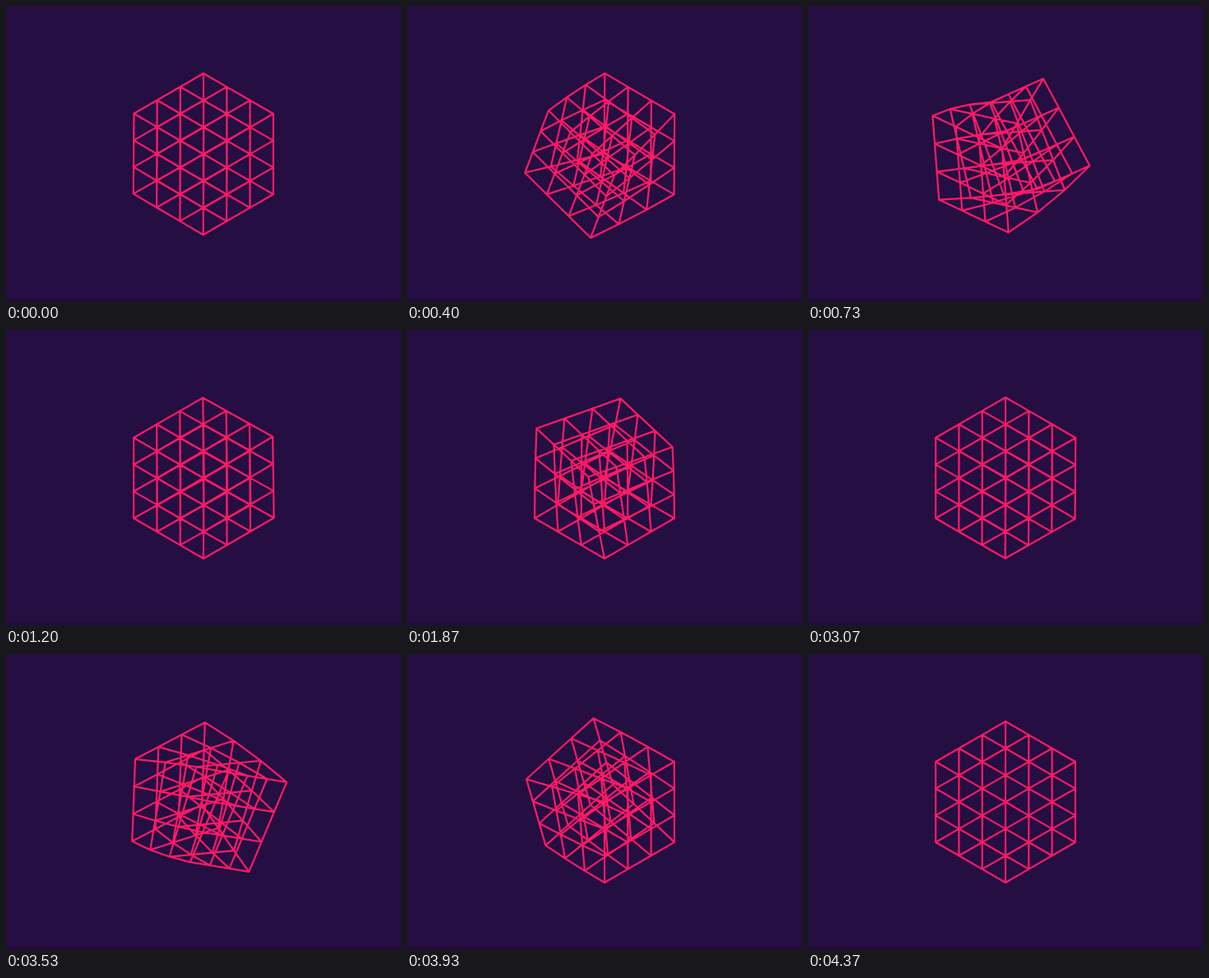
These frames come from a looping animation (480x360 px, 4610 ms). An HTML page:

```html
<!DOCTYPE html>
<html lang="en">
<head>
<meta charset="utf-8">
<title>Twisting cube</title>
<style>
  html, body { margin: 0; width: 100%; height: 100%; overflow: hidden; background: #240e42; }
  svg { display: block; width: 100%; height: 100%; }
</style>
</head>
<body>
<svg viewBox="0 0 480 360">
  <rect width="480" height="360" fill="#240e42"/>
  <rect y="356" width="480" height="4" fill="#200d38"/>
  <path id="grid" fill="none" stroke="#ff1a66" stroke-width="2.2" stroke-linecap="round" stroke-linejoin="round"/>
</svg>
<script>
const LOOP = 4610, STEP = 100 / 3, TURN = 46, MIRROR = 37;
const SIZE = 120, CELLS = 3;
const AXES = [2, 1, 0];

// Angle of the trailing face: [step, degrees]
const KEYS = [[10, 0], [13, 0.9], [15, 5.2], [16, 8.7], [19, 27], [22, 48.4],
  [24, 65.2], [26, 74], [29, 80.8], [32, 85.4], [35, 88.5], [39, 90]];

const slopes = KEYS.slice(1).map((p, i) => (p[1] - KEYS[i][1]) / (p[0] - KEYS[i][0]));
const tangents = KEYS.map((p, i) => {
  if (i === 0 || i === KEYS.length - 1) return 0;
  const a = slopes[i - 1], b = slopes[i];
  return 2 * a * b / (a + b);
});

function trailing(k) {
  if (k <= KEYS[0][0]) return 0;
  if (k >= KEYS[KEYS.length - 1][0]) return 90;
  const i = KEYS.findIndex(p => p[0] > k) - 1;
  const [x0, y0] = KEYS[i], [x1, y1] = KEYS[i + 1];
  const w = x1 - x0, s = (k - x0) / w, r = 1 - s;
  return y0 * (1 + 2 * s) * r * r + y1 * s * s * (3 - 2 * s)
    + w * s * r * (tangents[i] * r - tangents[i + 1] * s);
}

// The leading face makes the same move in reverse time
const leading = k => 90 - trailing(MIRROR - k);

// Every unit edge of the lattice, inside as well as on the faces
const edges = [];
for (let x = 0; x <= CELLS; x++)
  for (let y = 0; y <= CELLS; y++)
    for (let z = 0; z <= CELLS; z++)
      for (let d = 0; d < 3; d++) {
        const p = [x, y, z], q = [x, y, z];
        if (++q[d] <= CELLS) edges.push([p, q]);
      }

function place(cell, axis, lead, trail) {
  const p = cell.map(n => (n / CELLS - 0.5) * SIZE);
  const angle = (trail + (lead - trail) * cell[axis] / CELLS) * Math.PI / 180;
  const c = Math.cos(angle), s = Math.sin(angle);
  const u = (axis + 2) % 3, v = (axis + 1) % 3;
  [p[u], p[v]] = [p[u] * c - p[v] * s, p[u] * s + p[v] * c];
  const [x, y, z] = p;
  const sx = 240 + (x - z) / Math.SQRT2;
  const sy = 180 + (x + z) / Math.sqrt(6) - y * Math.sqrt(2 / 3);
  return sx.toFixed(2) + " " + sy.toFixed(2);
}

const grid = document.getElementById("grid");

function draw(time) {
  const n = Math.floor((time % LOOP + 8) / STEP);
  const axis = AXES[Math.floor(n / TURN) % 3], k = n % TURN;
  const lead = leading(k), trail = trailing(k);
  grid.setAttribute("d", edges.map(([p, q]) =>
    "M" + place(p, axis, lead, trail) + "L" + place(q, axis, lead, trail)).join(""));
}

let start;
function tick(now) {
  if (start === undefined) start = now;
  draw(Math.max(0, now - start));
  requestAnimationFrame(tick);
}
draw(0);
requestAnimationFrame(tick);
</script>
</body>
</html>
```
